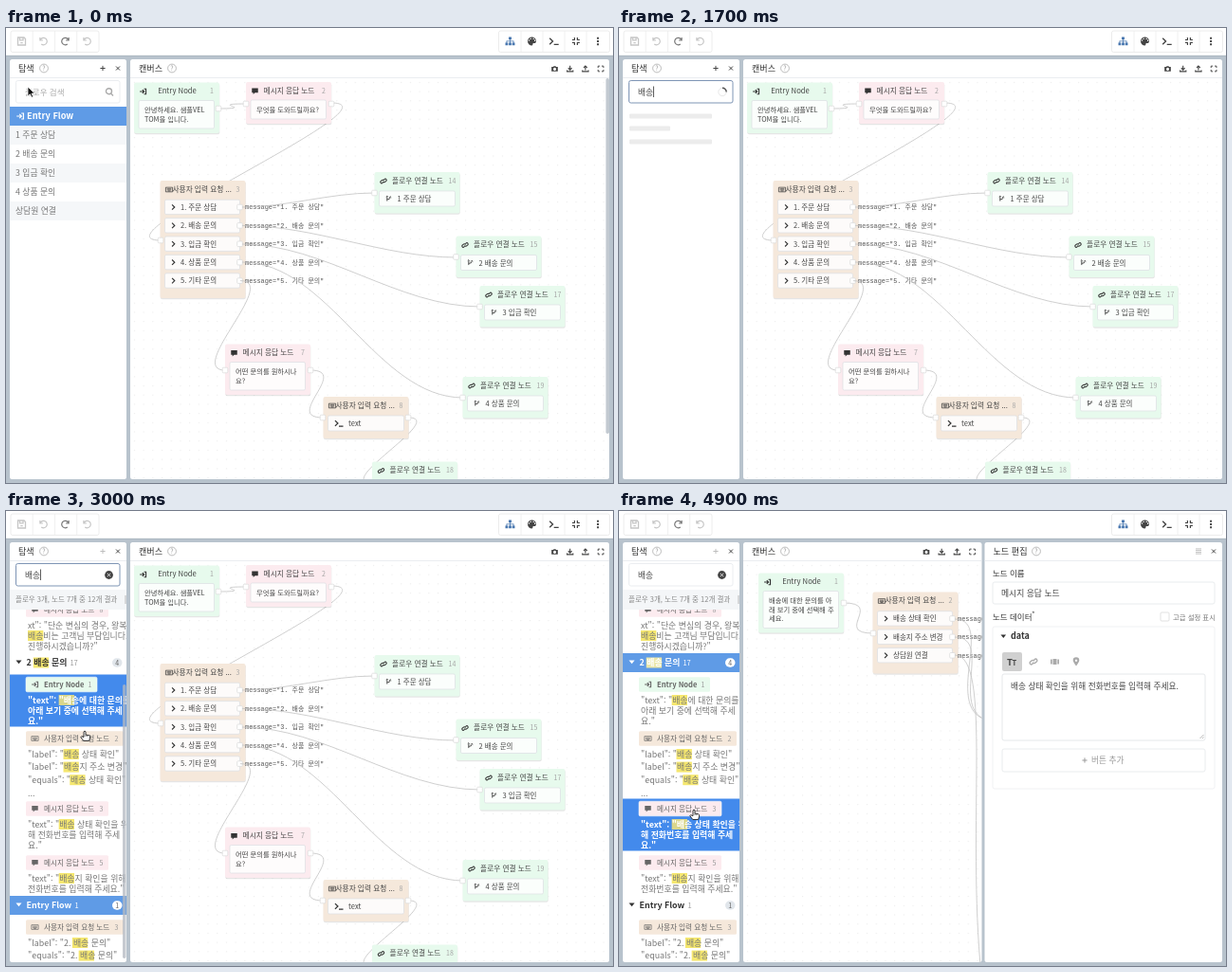
These frames come from a looping animation (640 by 480 pixels, 5 s). An HTML page:

```html
<!DOCTYPE html>
<html lang="ko">
<head>
<meta charset="utf-8">
<title>Flow search</title>
<style>
html, body { margin: 0; width: 100%; height: 100%; overflow: hidden; background: #b8c3cd; }
svg { display: block; width: 640px; height: 480px; }
text { font-family: "Noto Sans CJK KR", "Noto Sans", sans-serif; white-space: pre; }
.mono { font-family: "Liberation Mono", "Noto Sans CJK KR", monospace; }
.bg { fill: none; }
.hl { fill: #f5e76f; }
.on .bg { fill: #438aec; }
.on .hl { fill: #d9d68b; }
.on .line { fill: #fff; font-weight: 700; }
.on .chip { stroke: #fff; stroke-width: .6; }
.cur .bg { fill: #5f9be6; }
.cur .hl { fill: #ebe7a9; }
.cur .line, .cur .num { fill: #fff; }
.cur .caret { fill: #fff; }
.cur .badge { fill: #fff; }
</style>
</head>
<body>
<svg id="stage" viewBox="0 0 640 480" xmlns="http://www.w3.org/2000/svg"></svg>
<script>
(() => {
const KEY = '배송', LOOP = 5000;
const BLUE = '#5f9be6', GREEN = '#e7faed', PINK = '#fcebef', SAND = '#f5e8db';
const pen = document.createElement('canvas').getContext('2d');

function width(s, size, weight = 400) {
  pen.font = `${weight} ${size}px "Noto Sans CJK KR", "Noto Sans", sans-serif`;
  return pen.measureText(s).width;
}
const esc = s => s.replace(/&/g, '&amp;').replace(/</g, '&lt;');
const text = (s, x, y, size = 8.8, fill = '#444', extra = '') =>
  `<text x="${x}" y="${y + size * .36}" font-size="${size}" fill="${fill}" ${extra}>${esc(s)}</text>`;
const bold = 'font-weight="700"', medium = 'font-weight="500"', mid = 'text-anchor="middle"';
const rect = (x, y, w, h, fill, r = 0, extra = '') =>
  `<rect x="${x}" y="${y}" width="${w}" height="${h}" rx="${r}" fill="${fill}" ${extra}/>`;
const line = (d, c = '#c3c3c3', w = .8, extra = '') =>
  `<path d="${d}" fill="none" stroke="${c}" stroke-width="${w}" ${extra}/>`;
const border = (c, w = .8) => `stroke="${c}" stroke-width="${w}"`;

// Icons centred on 0,0: [path, stroke width or 0 for a filled shape]
const ICONS = {
  save: ['M-4-4H2.5L4-2.5V4H-4ZM-2-4V-1.2H1.5V-4M-1.2 1.6H1.2', 1.3],
  undo: ['M-3.6-4V-1H-.6M-3.4-1.2A3.7 3.7 0 1 1-2.2 3', 1.2],
  redo: ['M3.6-4V-1H.6M3.4-1.2A3.7 3.7 0 1 0 2.2 3', 1.2],
  tree: ['M-1.5-4.5H1.5V-1.8H-1.5ZM-5 1.5H-2.2V4.2H-5ZM-1.4 1.5H1.4V4.2H-1.4ZM2.2 1.5H5V4.2H2.2ZM-.4-2H.4V-.5H4V1.5H3.2V.3H.4V1.5H-.4V.3H-3.2V1.5H-4V-.5H-.4Z', 0],
  palette: ['M0-4.5A4.5 4.5 0 1 0 0 4.5C1.6 4.3.2 2.6 1.6 2H3.2Q4.5 1.6 4.5 0A4.5 4.5 0 0 0 0-4.5M-3-.2a.7.7 0 1 1 .1 0M-1.4-2a.7.7 0 1 1 .1 0M1.6-2a.7.7 0 1 1 .1 0M3.1-.1a.7.7 0 1 1 .1 0', 0],
  prompt: ['M-4.5-3.2L-1.2 0L-4.5 3.2M0 3.4H5', 1.4],
  shrink: ['M-1.5-4V-1.5H-4M1.5-4V-1.5H4M-1.5 4V1.5H-4M1.5 4V1.5H4', 1.2],
  expand: ['M-3-1V-3H-1M3-1V-3H1M-3 1V3H-1M3 1V3H1', 1],
  dots: ['M-1-4.3H1V-2.3H-1ZM-1-1H1V1H-1ZM-1 2.3H1V4.3H-1Z', 0],
  camera: ['M-3.5-2H-1.6L-1-3H1L1.6-2H3.5V3H-3.5ZM0-1.2A1.6 1.6 0 1 0 .1-1.2Z', 0],
  down: ['M0-3.5V1M-2-.8L0 1.2L2-.8M-3.3 1.5V3H3.3V1.5', 1.2],
  up: ['M0 1.5V-3M-2-1.2L0-3.2L2-1.2M-3.3 1.5V3H3.3V1.5', 1.2],
  plus: ['M-2.6 0H2.6M0-2.6V2.6', 1],
  close: ['M-2-2L2 2M2-2L-2 2', 1],
  enter: ['M-3.8 0H1.2M-.8-2.2L1.4 0L-.8 2.2M1.2-3H3.4V3H1.2', 1.2],
  talk: ['M-3.6-3.2H3.6V2H0L-2 4V2H-3.6Z', 0],
  keys: ['M-4-2.6H4V2.6H-4ZM-2.6-.9H2.6M-2.6.4H2.6M-1.6 1.6H1.6', .8],
  chain: ['M-.6 1.6L-1.6 2.6A1.5 1.5 0 0 1-3.2.2L-1.4-1.2A1.5 1.5 0 0 1 .6-.6M.6-1.6L1.6-2.6A1.5 1.5 0 0 1 3.2-.2L1.4 1.2A1.5 1.5 0 0 1-.6.6', 1.2],
  fork: ['M-2-2.5V3M-2 1Q2 1 2-1.5M-3.2-2.2L-2-3.4L-.8-2.2M.8-1.4L2-2.6L3.2-1.4', 1],
  more: ['M-1.6-3L1.4 0L-1.6 3', 1.3],
  loupe: ['M1.8 1.8L4 4M2.5-.8A3 3 0 1 1-3.5-.8A3 3 0 1 1 2.5-.8', 1.4],
  rows: ['M-3-2.6H3M-3-.9H3M-3 .9H3M-3 2.6H3', .7],
  film: ['M-4.5-2.5H-2.8V2.5H-4.5ZM-2-3H2V3H-2ZM2.8-2.5H4.5V2.5H2.8Z', 0],
  pin: ['M0 4.5Q-3.3.2-3.3-1.4A3.3 3.3 0 0 1 3.3-1.4Q3.3.2 0 4.5M0-2.5A1.2 1.2 0 1 0 .1-2.5Z', 0]
};
function icon(name, x, y, c = '#444', k = 1) {
  const [d, w] = ICONS[name];
  const paint = w ? `fill="none" stroke="${c}" stroke-width="${w}"` : `fill="${c}" fill-rule="evenodd"`;
  return `<path transform="translate(${x} ${y}) scale(${k})" d="${d}" ${paint}/>`;
}
const help = (x, y) => `<circle cx="${x}" cy="${y}" r="4.4" fill="none" stroke="#aaa" stroke-width=".8"/>` +
  text('?', x, y, 7, '#999', mid);
const panel = (x, w, title, q) => rect(x, 33, w, 443, '#fff', 2.5) + line(`M${x} 52.5H${x + w}`, '#e6e9ec') +
  text(title, x + 9, 42.5, 9.1, '#333', medium) + help(q, 42.5);
const group = (id, body, extra = '') => `<g id="${id}" ${extra}>${body}</g>`;

// Canvas parts
const port = (x, y) => rect(x - 2.8, y - 2.8, 5.6, 5.6, '#fff', 1, border('#d8d8d8', .7));
const slot = (x, y, w, h) => rect(x, y, w, h, '#fff', 1.5, 'fill-opacity=".85" ' + border('#dcdfe2', .7));
function node(x, y, h, fill, mark, title, num) {
  const left = mark === 'keys';
  return rect(x + .3, y + 1.2, 90, h, '#000', 2, 'opacity=".10"') + rect(x, y, 90, h, fill, 2) +
    icon(mark, x + 9.5, y + 9.5, '#333', .9) +
    text(title, x + (left ? 13 : 45.5), y + 9, 7.7, '#444', left ? '' : mid) +
    text(num, x + 82, y + 9, 7, '#a5a5a5', mid);
}
const talkNode = (x, y, h, fill, mark, title, num, lines) =>
  node(x, y, h, fill, mark, title, num) + slot(x + 5, y + 19, 79.5, h - 24) +
  lines.map((s, i) => text(s, x + 11, y + 29 + i * 9.6, 7.3)).join('');
const jump = (x, y, num, s) => node(x, y, 43.5, GREEN, 'chain', '플로우 연결 노드', num) +
  slot(x + 5, y + 20, 80, 16) + icon('fork', x + 15, y + 28, '#333', .85) + text(s, x + 24, y + 28.3, 7.5) + port(x, y + 22);
function menu(x, y, h, num, opts) {
  return node(x, y, h, SAND, 'keys', '사용자 입력 요청 ...', num) + opts.map((s, i) => {
    const cy = y + 28 + i * 19.4;
    return slot(x + 5, cy - 7.8, 79, 15.4) + icon('more', x + 14, cy, '#333', .9) + text(s, x + 21.5, cy, 7.5) +
      port(x + 84, cy) + text(`message="${s}"`, x + 89.5, cy, 6.9, '#555', 'class="mono"');
  }).join('');
}
function link(x1, y1, x2, y2) {
  const d = Math.max(Math.hypot(x2 - x1, y2 - y1) / 3, 42);
  return line(`M${x1} ${y1}C${x1 + d} ${y1} ${x2 - d} ${y2} ${x2} ${y2}`);
}
const tools = x => ['camera', 'down', 'up', 'expand'].map((n, i) => icon(n, x + i * 16.2, 43, '#444', .95)).join('');
const grid = rect(131, 53, 505, 423, 'url(#grid)');

const mainFlow = grid +
  link(224, 85, 253, 80) + link(343, 79, 163, 224) +
  talkNode(135, 57.5, 53.5, GREEN, 'enter', 'Entry Node', '1', ['안녕하세요. 샘플VEL', 'TOM을 입니다.']) +
  talkNode(253, 57, 44, PINK, 'talk', '메시지 응답 노드', '2', ['무엇을 도와드릴까요?']) +
  menu(162.5, 161, 124, '3', ['1. 주문 상담', '2. 배송 문의', '3. 입금 확인', '4. 상품 문의', '5. 기타 문의']) +
  link(249, 189, 388, 174) + link(249, 208.4, 475, 242) + link(249, 228, 500, 294) +
  link(249, 247, 482, 390) + link(247, 266.6, 231, 361) + link(321, 361, 334, 411) + link(424, 411, 386, 480) +
  jump(388.5, 152, '14', '1 주문 상담') + jump(474.5, 219.5, '15', '2 배송 문의') +
  jump(499.5, 272, '17', '3 입금 확인') + jump(481.5, 368, '19', '4 상품 문의') + jump(386, 457.5, '18', '5 기타 문의') +
  talkNode(231, 333.5, 53.5, PINK, 'talk', '메시지 응답 노드', '7', ['어떤 문의를 원하시나', '요?']) +
  node(334.5, 389, 44, SAND, 'keys', '사용자 입력 요청 ...', '8') + slot(339.5, 409, 80, 16) +
  icon('prompt', 351, 417, '#333', .9) + text('text', 361, 417, 7.6) +
  [[224, 85], [253, 80], [343, 80], [163, 224], [231, 361], [321, 361], [334, 411], [424, 411]].map(p => port(...p)).join('');

const subFlow = grid + link(237, 97, 268, 129) +
  talkNode(147, 65.5, 63, GREEN, 'enter', 'Entry Node', '1', ['배송에 대한 문의를 아', '래 보기 중에 선택해 주', '세요.']) +
  menu(267.5, 85.5, 86, '2', ['배송 상태 확인', '배송지 주소 변경', '상담원 연결']) +
  line('M354 114C400 114 332 222 400 222M354 133C398 133 340 222 400 222M354 152C394 152 366 330 382 490') +
  port(237, 97) + port(268, 129);

const editor = panel(385.5, 250.5, '노드 편집', 440) + icon('rows', 611, 42.5, '#aaa') + icon('close', 627, 42.5) +
  text('노드 이름', 394, 66, 8.5, '#333', medium) +
  rect(394, 75, 234, 23, '#fff', 2, border('#e4e7ea')) + text('메시지 응답 노드', 403, 86.5) +
  text('노드 데이터', 394, 111.5, 8.5, '#333', medium) + text('*', 435, 109, 8, '#666') +
  rect(571, 107, 9, 9, '#fff', 1, border('#dadada')) + text('고급 설정 표시', 584, 112, 7.4, '#777') +
  rect(394, 122, 234, 171, 'none', 2, border('#eceef0')) + '<path d="M402.5 130.5h5.6l-2.8 3.6z" fill="#333"/>' +
  text('data', 413, 132, 9, '#333', bold) +
  rect(404, 149, 21, 20, '#d0d0d0', 2) + text('T', 409, 159.5, 9.5, '#444', bold) + text('T', 414.5, 160.3, 7.5, '#444', bold) +
  icon('chain', 437, 159, '#aaa', 1.1) + icon('film', 459.5, 159, '#aaa') + icon('pin', 482, 159, '#aaa') +
  rect(404, 172, 214, 70, '#fff', 2, border('#dfe2e5')) + line('M612.5 240L616.5 236M615 240L616.5 238.5', '#999', .7) +
  text('배송 상태 확인을 위해 전화번호를 입력해 주세요.', 413, 185, 8.7) +
  rect(404, 251, 214, 24, '#fff', 2, border('#e4e7ea')) + icon('plus', 491, 263, '#999') + text('버튼 추가', 498, 263, 8.7, '#999');

// Sidebar parts
const flows = rect(4, 83, 123, 20, BLUE) + icon('enter', 15, 93, '#fff') + text('Entry Flow', 22, 93, 9.2, '#fff', bold) +
  ['1 주문 상담', '2 배송 문의', '3 입금 확인', '4 상품 문의', '상담원 연결'].map((s, i) =>
    rect(4, 103 + i * 20, 123, 20, i % 2 ? '#fff' : '#f5f7f9') + text(s, 10, 113 + i * 20, 8.8, '#777')).join('');

const recent = rect(10, 80.5, 120, 145, '#000', 2, 'opacity=".15"') + rect(10, 80, 120, 144.5, '#424147', 2) +
  ['노드', '상담', '하이루', 'ㅁㄴㅇㄹ', 'sandbox', '진입'].map((s, i) => text(s, 17, 97 + i * 22.4, 7.8, '#fff', bold)).join('');

const skeleton = [[93, 87], [106, 43], [120, 87]].map(([y, w]) => rect(11, y - 2.6, w, 5.2, '#ececec', 1)).join('');

// Text line with every occurrence of the search word marked
function rich(s, x, y, size, weight, fill) {
  let out = '';
  for (let i = s.indexOf(KEY); i >= 0; i = s.indexOf(KEY, i + 1))
    out += `<rect class="hl" x="${x + width(s.slice(0, i), size, weight)}" y="${y - 5.5}" width="${width(KEY, size, weight)}" height="11"/>`;
  return out + text(s, x, y, size, fill, `class="line" font-weight="${weight}"`);
}
const KINDS = {
  talk: [87, PINK, '메시지 응답 노드'],
  enter: [75, GREEN, 'Entry Node'],
  keys: [103, SAND, '사용자 입력 요청 노드']
};
const heads = [[114, '1 주문 상담', '16', '2'], [260, '2 배송 문의', '17', '4'], [516, 'Entry Flow', '1', '1']];
const hits = [
  [136, 'talk', '6', ['발한 경우 주문 취소가 어렵', '습니다. 배송 상태 확인을 위', '해 전화번호를 입력해 주세', '요."']],
  [204, 'talk', '8', ['xt": "단순 변심의 경우, 왕복', '배송비는 고객님 부담입니다.', '진행하시겠습니까?"']],
  [283, 'enter', '1', ['"text": "배송에 대한 문의를', '아래 보기 중에 선택해 주세', '요."']],
  [340, 'keys', '2', ['"label": "배송 상태 확인"', '"label": "배송지 주소 변경"', '"equals": "배송 상태 확인"', '...']],
  [414, 'talk', '3', ['"text": "배송 상태 확인을 위', '해 전화번호를 입력해 주세', '요."']],
  [471, 'talk', '5', ['"text": "배송지 확인을 위해', '전화번호를 입력해 주세요."']],
  [539, 'keys', '3', ['"label": "2. 배송 문의"', '"equals": "2. 배송 문의"']]
];
const leading = kind => kind === 'keys' ? 13.6 : 11;
const hitTop = h => h[0] - 10.5;
const hitEnd = h => h[0] + 16.5 + leading(h[1]) * (h[3].length - 1) + 6;

const headView = ([y, s, num, count], i) => group('head' + i,
  `<rect class="bg" x="4" y="${y - 10}" width="123" height="20"/>` +
  `<path class="caret" d="M10.5 ${y - 2.6}h6l-3 3.8z" fill="#333"/>` + rich(s, 21.5, y, 8.9, 700, '#333') +
  text(num, 25.5 + width(s, 8.9, 700), y, 7.5, '#999', 'class="num"') +
  rect(112, y - 4.7, 10.5, 9.4, '#e1e6eb', 4.7, 'class="badge"') + text(count, 117.2, y, 7, '#666', mid));
const hitView = (h, i) => {
  const [y, kind, num, lines] = h, [w, fill, name] = KINDS[kind];
  return group('hit' + i, `<rect class="bg" x="4" y="${hitTop(h)}" width="123" height="${hitEnd(h) - hitTop(h)}"/>` +
    rect(21, y - 7.8, w, 15.6, fill, 1.5, 'class="chip"') + icon(kind, 30.5, y, '#666', .9) +
    text(name, 40, y, 7.6, '#666', kind === 'enter' ? bold : '') + text(num, 13.5 + w, y, 7, '#999', mid) +
    lines.map((s, k) => rich(s, 23, y + 16.5 + k * leading(kind), 8.9, 400, '#777')).join(''));
};
const results = rect(4, 83, 123, 21, '#f4f6f8') + text('플로우 3개, 노드 7개 중 12개 결과', 10, 93.5, 7.5, '#888') +
  line('M126 89V98', '#aaa') +
  `<g clip-path="url(#listClip)">${group('list', heads.map(headView).join('') + hits.map(hitView).join(''))}
  ${rect(123, 104, 3.4, 289, '#b3b9c0', 1.7, 'id="thumb" opacity=".75"')}</g>`;

const bar = rect(0, 0, 640, 29, '#fff') + line('M0 29.3H640', '#a8b3bd', .7) +
  rect(5, 3, 93, 22.5, '#fff', 2, border('#e8e8e8')) + line('M28.2 3V25.5M51.5 3V25.5M74.7 3V25.5', '#ececec') +
  icon('save', 16.5, 14, '#c6c6c6') + icon('undo', 39.5, 14, '#c6c6c6') + icon('redo', 62.5, 14, '#777') + icon('undo', 85.5, 14, '#c6c6c6') +
  rect(519.5, 3, 117, 22.5, '#fff', 2, border('#e8e8e8')) + line('M543 3V25.5M566 3V25.5M589 3V25.5M612 3V25.5', '#ececec') +
  icon('tree', 531.5, 14, '#4a78b0') +
  ['palette', 'prompt', 'shrink', 'dots'].map((n, i) => icon(n, 554.5 + i * 23.2, 14)).join('');

const stage = document.getElementById('stage');
stage.innerHTML = `<defs>
  <pattern id="grid" x="131" y="53" width="9.7" height="9.7" patternUnits="userSpaceOnUse"><rect x="4" y="4" width="1" height="1" fill="#e6e6e6"/></pattern>
  <clipPath id="wide"><rect x="131" y="53" width="505" height="423"/></clipPath>
  <clipPath id="slim"><rect x="131" y="53" width="251.5" height="423"/></clipPath>
  <clipPath id="side"><rect x="4" y="33" width="123" height="443"/></clipPath>
  <clipPath id="listClip"><rect x="4" y="104" width="123" height="372"/></clipPath></defs>` +
  rect(0, 0, 640, 480, '#b8c3cd') + bar +
  group('full', panel(131, 505, '캔버스', 175) + tools(578.5) +
    group('flowA', mainFlow + rect(632.5, 53, 3.5, 375, '#c3cad1', 1.7, 'id="rail"'), 'clip-path="url(#wide)"')) +
  group('split', panel(131, 251.5, '캔버스', 175) + tools(324) + `<g clip-path="url(#slim)">${subFlow}</g>` + editor) +
  panel(4, 123, '탐색', 40) + group('add', icon('plus', 102, 42.5)) + icon('close', 118, 42.5) +
  group('flows', flows) + group('skeleton', skeleton) + group('results', results, 'clip-path="url(#side)"') +
  rect(10.5, 55.5, 109.5, 23.5, '#fff', 2, 'id="field"') +
  text('플로우 검색', 20, 67.5, 8.5, '#aaa', 'id="hint"') + text('', 20, 67.5, 8.7, '#444', 'id="query"') +
  line('M0 61.5V73', '#333', .8, 'id="caret"') +
  group('lens', icon('loupe', 109, 67.5, 'currentColor')) +
  group('spin', '<circle r="4.2" fill="none" stroke="#ddd" stroke-width=".7"/>' + line('M0-4.2A4.2 4.2 0 0 1 4.2 0', '#555', 1.4)) +
  group('clear', '<circle cx="108.5" cy="67.5" r="4.4" fill="#444"/>' + icon('close', 108.5, 67.5, '#fff', .85)) +
  group('recent', recent) +
  group('arrow', '<path d="M0 0V10L2.4 7.8L4 11.3L5.7 10.5L4.1 7.1H7.3Z" fill="#111" stroke="#fff" stroke-width=".8"/>') +
  group('hand', '<path d="M-1 .8Q0-.8 1 .8V4L4.8 4.8Q6 5.2 5.6 7L4.6 10.5H-1.2L-4.3 6.5Q-3.8 5-1 6.6Z" fill="#fff" stroke="#222" stroke-width=".9"/><path d="M1 4V6M2.9 4.5V6.2" stroke="#222" stroke-width=".6"/>');

const $ = id => document.getElementById(id);
const show = (id, on) => $(id).setAttribute('display', on ? 'inline' : 'none');
const set = (id, k, v) => $(id).setAttribute(k, v);
const clamp = v => Math.max(0, Math.min(1, v));
const ease = v => v * v * (3 - 2 * v);

// Pointer stops: time, x, y
const stops = [[0, 23, 62], [300, 23, 62], [400, 24, 66], [2000, 62, 72], [2500, 72, 120], [2800, 80, 180],
  [3000, 83, 232], [3700, 82, 329], [4300, 80, 328], [4900, 79, 315]];
function pointer(t) {
  const i = stops.findIndex(p => p[0] > t);
  if (i < 1) return stops[i < 0 ? stops.length - 1 : 0].slice(1);
  const [t0, x0, y0] = stops[i - 1], [t1, x1, y1] = stops[i], k = (t - t0) / (t1 - t0);
  return [x0 + (x1 - x0) * k, y0 + (y1 - y0) * k];
}
const typed = t => t < 1300 ? '' : ['ㅂ', '배', '배소'][Math.floor((t - 1300) / 100)] || KEY;

function draw(time) {
  const t = Math.floor(time / 100) * 100;
  const query = typed(t), focus = t >= 500 && t < 4100, found = t >= 1800, opened = t >= 4100;
  const scroll = 100 * ease(clamp((t - 2500) / 400));

  show('full', t < 4700);
  show('split', t >= 4700);
  show('flowA', !opened);
  set('rail', 'opacity', clamp((1200 - t) / 200));

  set('add', 'opacity', found ? .35 : 1);
  show('flows', !query);
  show('recent', t >= 500 && !query);
  show('skeleton', query && !found);
  show('results', found);
  set('list', 'transform', `translate(0 ${-scroll})`);
  set('thumb', 'y', 104 + scroll * .79);
  show('thumb', t > 2500 && t < 4700);

  set('field', 'stroke', focus ? '#7e95b5' : '#e6e9ec');
  set('field', 'stroke-width', focus ? 1 : .8);
  show('hint', t < 500);
  $('query').textContent = query;
  const since = t - (t < 1300 ? 500 : Math.min(t, 1600));
  show('caret', focus && since % 1000 < 500);
  set('caret', 'transform', `translate(${20.5 + width(query, 8.7)} 0)`);
  show('lens', !query);
  set('lens', 'color', focus ? '#222' : '#aaa');
  show('spin', query && !found);
  set('spin', 'transform', `translate(109 67.5) rotate(${(t - 1700) * .36})`);
  show('clear', found);

  const [x, y] = pointer(t), hoverY = pointer(t - 200)[1];
  const over = h => found && hoverY > 104 && hoverY + scroll >= hitTop(h) && hoverY + scroll < hitEnd(h);
  hits.forEach((h, i) => set('hit' + i, 'class', (opened ? i === 4 : over(h)) ? 'on' : ''));
  heads.forEach((h, i) => set('head' + i, 'class', i === (opened ? 1 : 2) ? 'cur' : ''));
  show('arrow', t < 500);
  show('hand', t >= 2100);
  set('arrow', 'transform', `translate(${x} ${y})`);
  set('hand', 'transform', `translate(${x} ${y})`);
}

let start;
function tick(now) {
  if (start === undefined) start = now;
  draw((now - start) % LOOP);
  requestAnimationFrame(tick);
}
draw(0);
requestAnimationFrame(tick);
})();
</script>
</body>
</html>
```
